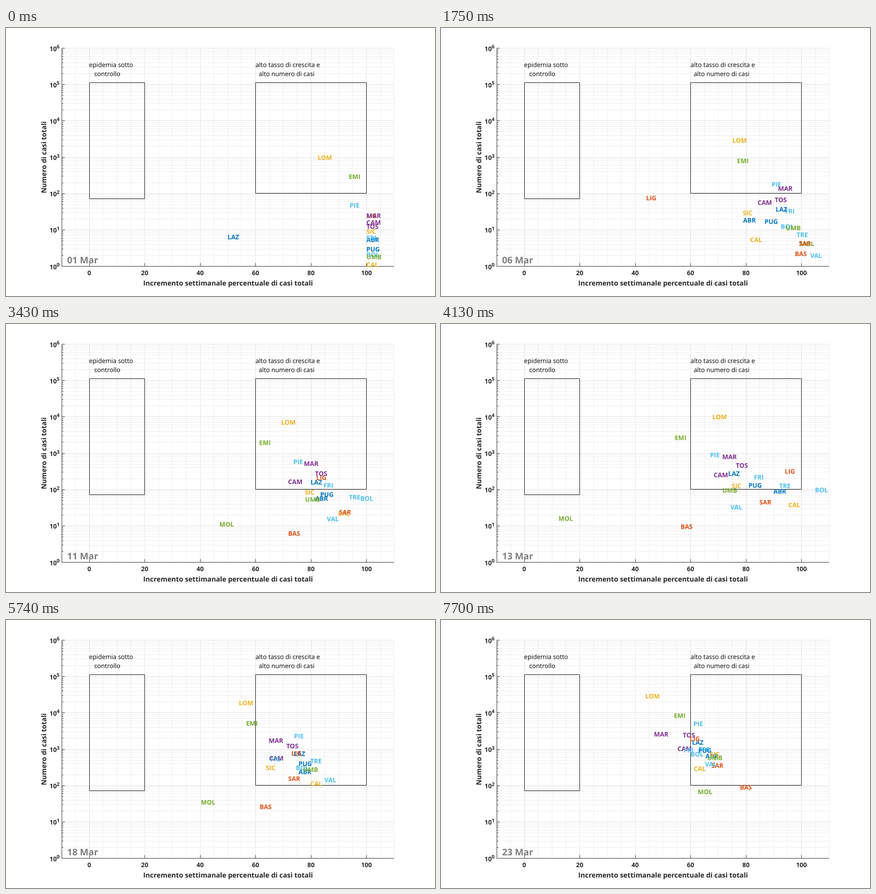
An HTML page for the animation above (8000 ms loop, 948x591 px).

```html
<!DOCTYPE html>
<html lang="it">
<head>
<meta charset="utf-8">
<title>Casi totali e incremento settimanale</title>
<style>
  html, body { margin: 0; width: 100%; height: 100%; overflow: hidden; background: #fff; }
  svg { display: block; width: 948px; height: 591px; }
  text { font-family: 'Open Sans', 'Noto Sans', sans-serif; text-rendering: geometricPrecision; white-space: pre; }
  .major { stroke: #dfdfdf; }
  .minor { stroke: #cccccc; stroke-dasharray: 1 2; }
  .axis { stroke: #262626; fill: none; }
  .zone { stroke: #000; fill: none; }
  .tick { font-weight: 700; font-size: 13.8px; fill: #262626; }
  .power { font-weight: 700; font-size: 11px; fill: #262626; }
  .title { font-weight: 700; font-size: 15.2px; fill: #262626; text-anchor: middle; }
  .note { font-size: 13.9px; fill: #000; }
  .date { font-weight: 700; font-size: 20.2px; fill: #808080; }
  .region { font-weight: 700; font-size: 14px; }
</style>
</head>
<body>
<svg id="chart" viewBox="0 0 948 591"></svg>
<script>
const chart = document.getElementById('chart');
const LEFT = 123, RIGHT = 857.5, TOP = 44.5, BOTTOM = 525.5;
const xAt = percent => 184 + percent * 6.125;
const yAt = cases => BOTTOM - Math.log10(cases) * (BOTTOM - TOP) / 6;
const crisp = v => Math.floor(v) + 0.5;
const lerp = (a, b, f) => a + (b - a) * f;

function add(tag, attrs, content) {
  const node = document.createElementNS('http://www.w3.org/2000/svg', tag);
  for (const key in attrs) node.setAttribute(key, attrs[key]);
  if (content !== undefined) node.textContent = content;
  return chart.appendChild(node);
}
const path = (cls, d) => add('path', { class: cls, d });
const text = (cls, x, y, content, more) => add('text', { class: cls, x, y, ...more }, content);
const vertical = (cls, x, y1 = TOP, y2 = BOTTOM) => path(cls, `M${crisp(x)} ${y1}V${y2}`);
const horizontal = (cls, y, x1 = LEFT, x2 = RIGHT) => path(cls, `M${x1} ${crisp(y)}H${x2}`);

function drawGrid() {
  for (let p = -5; p <= 110; p += 5) if (p % 20) vertical('minor', xAt(p));
  for (let k = 0; k < 6; k++)
    for (let m = 2; m < 10; m++) horizontal('minor', yAt(m * 10 ** k));
  for (let p = 0; p <= 100; p += 20) vertical('major', xAt(p));
  for (let k = 1; k <= 6; k++) horizontal('major', yAt(10 ** k));
}

function drawAxes() {
  path('axis', `M${LEFT + 0.5} ${TOP - 0.5}V${BOTTOM}H${RIGHT}`);
  for (let p = 0; p <= 100; p += 20) {
    vertical('axis', xAt(p), BOTTOM - 7, BOTTOM);
    text('tick', xAt(p), 545, p, { 'text-anchor': 'middle' });
  }
  for (let k = 0; k <= 6; k++) {
    const y = yAt(10 ** k);
    horizontal('axis', y, LEFT, LEFT + 7);
    text('tick', 96.3, y + 6, '10');
    text('power', 112, y + 0.5, k);
    if (k < 6) for (let m = 2; m < 10; m++) horizontal('axis', yAt(m * 10 ** k), LEFT, LEFT + 3.5);
  }
  text('title', 490.8, 567.5, 'Incremento settimanale percentuale di casi totali');
  text('title', 0, 0, 'Numero di casi totali', { transform: 'translate(88.5 285) rotate(-90)' });
}

function drawZone(from, to, low, high) {
  const [x1, x2] = [crisp(xAt(from)), crisp(xAt(to))];
  const [y1, y2] = [crisp(yAt(high) - 0.7), crisp(yAt(low) - 0.7)];
  path('zone', `M${x1} ${y1}H${x2}V${y2}H${x1}Z`);
}

drawGrid();
drawAxes();
drawZone(0, 20, 70, 1.1e5);
drawZone(60, 100, 100, 1.1e5);
text('note', 183.6, 86.3, 'epidemia sotto');
text('note', 195, 105.6, 'controllo');
text('note', 551.6, 86.3, 'alto tasso di crescita e');
text('note', 558.4, 105.6, 'alto numero di casi');
const date = text('date', 135, 519.3, '');

const STEP_MS = 70, LAST_STEP = 110, LOOP_MS = 8000, STEPS_PER_DAY = 5;
const TURNS = [17, 34, 59, 82, LAST_STEP];
const BLUE = '#0072bd', ORANGE = '#d95319', GOLD = '#edb120',
      PURPLE = '#7e2f8e', GREEN = '#77ac30', SKY = '#4dbeee';
const regions = [];

// A label rises from bottom to top, slowing down by "bend", and drifts
// sideways from 100% (or "from") through its last few turning points.
function region(name, color, [bottom, top, bend = 1.4], xs, { born = 0, from = 797 } = {}) {
  const turns = TURNS.slice(-xs.length).map((step, i) => [step, xs[i]]);
  const node = text('region', -0.5, 5, name, { fill: color });
  regions.push({ node, born, bottom, top, bend, turns: [[born, from], ...turns] });
}

region('ABR', BLUE, [467, 300, 1.15], [722, 607, 735, 647, 585]);
region('BAS', ORANGE, [524, 369, 1], [798, 765, 530, 561, 661], { born: 8 });
region('BOL', SKY, [500, 296], [781, 718, 827, 641, 552]);
region('CAL', GOLD, [522, 328, 1.3], [683, 684, 768, 673, 559]);
region('CAM', PURPLE, [429, 284], [740, 655, 603, 582, 523]);
region('EMI', GREEN, [328, 211], [682, 624, 517, 531, 515], { from: 758 });
region('FRI', SKY, [463, 287, 1.6], [799, 717, 692, 585, 537]);
region('LAZ', BLUE, [461, 270, 1.5], [748, 731, 635, 636, 555], { from: 490 });
region('LIG', ORANGE, [414, 262, 1.15], [346, 575, 760, 631, 550]);
region('LOM', GOLD, [286, 168, 1.5], [665, 621, 600, 515, 452], { from: 689 });
region('MAR', PURPLE, [414, 252, 1.8], [773, 714, 622, 581, 471]);
region('MOL', GREEN, [505, 379, 1.3], [796, 790, 260, 431, 568], { born: 6, from: 812 });
region('PIE', SKY, [391, 229, 1.3], [762, 696, 595, 637, 558], { from: 760 });
region('TRE', SKY, [522, 285, 1.7], [797, 774, 748, 673, 569], { born: 7 });
region('PUG', BLUE, [488, 288], [714, 717, 680, 647, 569]);
region('SAR', ORANGE, [524, 321, 1.5], [797, 785, 704, 624, 598], { born: 8, from: 830 });
region('SIC', GOLD, [449, 296, 1.2], [649, 688, 643, 575, 595]);
region('TOS', PURPLE, [438, 254, 1.5], [744, 731, 652, 620, 535]);
region('UMB', GREEN, [505, 304, 1.5], [799, 721, 622, 657, 589]);
region('VAL', SKY, [522, 318, 1.5], [814, 640, 704, 584], { born: 19, from: 818 });

function driftAt(turns, step) {
  const next = Math.max(1, turns.findIndex(turn => turn[0] >= step));
  const [[s0, x0], [s1, x1]] = [turns[next - 1], turns[next]];
  return lerp(x0, x1, (step - s0) / (s1 - s0));
}

function show(step) {
  const day = 1 + Math.ceil(step / STEPS_PER_DAY);
  date.textContent = String(day).padStart(2, '0') + ' Mar';
  for (const { node, born, bottom, top, bend, turns } of regions) {
    const left = (LAST_STEP - step) / (LAST_STEP - born);
    node.setAttribute('visibility', left <= 1 ? 'visible' : 'hidden');
    if (left > 1) continue;
    const y = lerp(top, bottom, left ** bend);
    node.setAttribute('transform', `translate(${driftAt(turns, step)} ${y})`);
  }
}

const start = performance.now();
let shown = -1;
function tick() {
  const time = (performance.now() - start) % LOOP_MS;
  const step = Math.min(LAST_STEP, Math.floor(time / STEP_MS));
  if (step !== shown) show(shown = step);
  requestAnimationFrame(tick);
}
tick();
</script>
</body>
</html>
```
